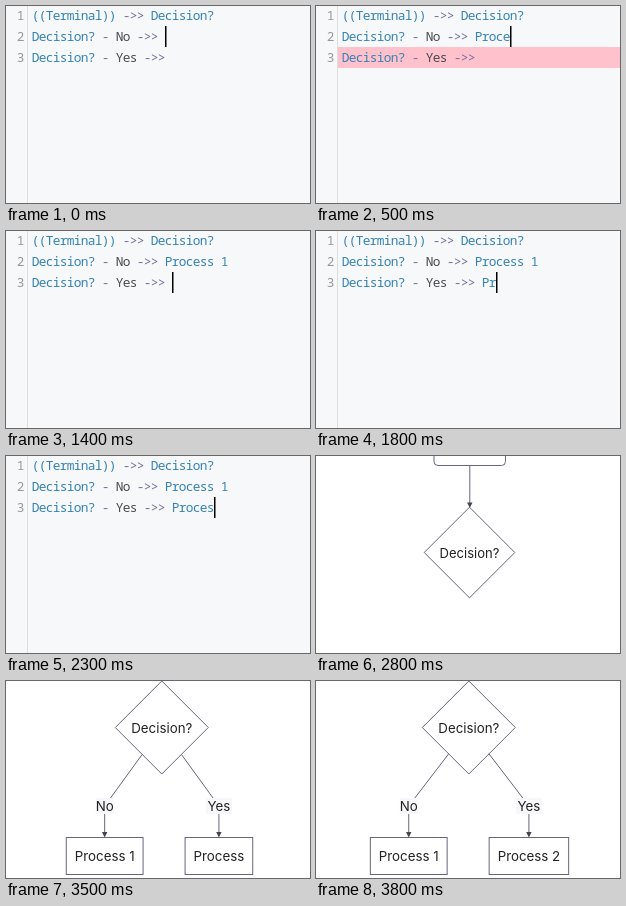
Recreate the animation shown at these times as an HTML page. Size 304 by 197 pixels, loop 4.4 s.

```html
<!DOCTYPE html>
<html lang="en">
<head>
<meta charset="utf-8">
<title>Typing a flowchart</title>
<style>
html, body { margin: 0; width: 100%; height: 100%; overflow: hidden; background: #fff; }
svg { display: block; width: 304px; height: 197px; }
text { white-space: pre; }
#editor text { font: 500 12.8px "Noto Sans Mono", "DejaVu Sans Mono", monospace; letter-spacing: -0.68px; }
#chart text { font: 13.3px Inter, Roboto, sans-serif; fill: #222; text-anchor: middle; }
#chart path, #chart rect.node { fill: none; stroke: #68667a; stroke-width: 1; }
#chart path.tip { fill: #44434f; stroke: none; }
</style>
</head>
<body>
<svg viewBox="0 0 304 197">
  <g id="editor"></g>
  <g id="chart"></g>
</svg>
<script>
const LOOP = 4400, CHAR = 7, LEFT = 26, ROW = 21, MIDDLE = 153.5;
const BLUE = '#3583b4', PURPLE = '#746c9c', DARK = '#4a4a52', GREY = '#96989e';
const editor = document.getElementById('editor');
const chart = document.getElementById('chart');

// Each step: [time, scene, first label, second label, active row, error row shown]
const steps = [[0, 'editor', '', '', 1, false]];
const type = (word, times, make) =>
  times.forEach((time, i) => steps.push([time, ...make(word.slice(0, i + 1))]));

type('Process 1', [100, 200, 300, 400, 500, 600, 700, 800, 900],
  s => ['editor', s, '', 1, s.length > 1]);
steps.push([1300, 'editor', 'Process 1', '', 2, false]);
type('Process 2', [1700, 1800, 1900, 2100, 2200, 2300, 2400, 2500, 2700],
  s => ['editor', 'Process 1', s, 2, false]);
steps.push([2800, 'start']);
[[3100, 'Pro'], [3200, 'Proc'], [3300, 'Proce'], [3400, 'Proces'], [3500, 'Process'], [3700, 'Process 2']]
  .forEach(([time, label]) => steps.push([time, 'branches', 'Process 1', label]));

function add(parent, tag, attrs, text) {
  const el = document.createElementNS('http://www.w3.org/2000/svg', tag);
  for (const key in attrs) el.setAttribute(key, attrs[key]);
  if (text) el.textContent = text;
  parent.append(el);
  return el;
}

function drawLine(row, tokens) {
  const y = 14 + row * ROW;
  add(editor, 'text', { x: 10.7, y, fill: GREY }, String(row + 1));
  let col = 0;
  for (const [word, fill] of tokens) {
    add(editor, 'text', { x: LEFT - 0.3 + col * CHAR, y, fill }, word);
    col += word.length + 1;
  }
}

function drawEditor(first, second, active, error) {
  add(editor, 'rect', { width: 304, height: 197, fill: '#f7f8fa' });
  add(editor, 'rect', { x: 21, width: 1, height: 197, fill: '#dddee1' });
  if (error) add(editor, 'rect', { x: 22, y: 41, width: 282, height: ROW, fill: '#ffc2cc' });
  const branch = (answer, label) =>
    [['Decision?', BLUE], ['-', PURPLE], [answer, DARK], ['->>', PURPLE], [label, BLUE]];
  drawLine(0, [['((Terminal))', BLUE], ['->>', PURPLE], ['Decision?', BLUE]]);
  drawLine(1, branch('No', first));
  drawLine(2, branch('Yes', second));
  const col = active === 1 ? 19 + first.length : 20 + second.length;
  add(editor, 'rect', { x: LEFT + col * CHAR, y: active * ROW - 1, width: 1.5, height: ROW, fill: '#000' });
}

const path = (d, cls = '') => add(chart, 'path', { d, class: cls });
const label = (x, y, text, style = '') => add(chart, 'text', { x, y, style }, text);

function drawDiamond(x, y, r, style) {
  path(`M${x} ${y - r}L${x + r} ${y}L${x} ${y + r}L${x - r} ${y}Z`);
  label(x, y + 5, 'Decision?', style);
}

function drawArrow(x, y1, y2) {
  path(`M${x} ${y1}V${y2 - 3}`);
  path(`M${x - 2.7} ${y2 - 5}h5.4l-2.7 5.5z`, 'tip');
}

function drawStart() {
  add(chart, 'rect', { class: 'node', x: 118, y: -24, width: 71.5, height: 33.5, rx: 4 });
  drawArrow(153.8, 10, 51.5);
  drawDiamond(MIDDLE, 96.5, 45.3, 'font-size:13.05px');
}

function drawBranch(top, x, width, answer, name) {
  const dx = x - top.x, dy = 125 - top.y;
  const k = top.r / (Math.abs(dx) + dy);
  path(`M${top.x + dx * k} ${top.y + dy * k}L${x} 125`);
  drawArrow(x, 125, 156);
  const half = answer.length * 4 + 1;
  add(chart, 'rect', { x: x - half, y: 117, width: half * 2, height: 16, fill: '#f7f6fa' });
  label(x, 130, answer);
  add(chart, 'rect', { class: 'node', x: x - width / 2, y: 156.5, width, height: 37 });
  label(x, 180, name);
}

function textWidth(text) {
  const el = label(0, 0, text);
  const width = el.getComputedTextLength();
  el.remove();
  return width;
}

function drawBranches(first, second) {
  const gap = 42, w1 = textWidth(first) + 17, w2 = textWidth(second) + 17;
  const left = MIDDLE - (w1 + gap + w2) / 2;
  const x1 = left + w1 / 2, x2 = left + w1 + gap + w2 / 2;
  const top = { x: (x1 + x2) / 2, y: 46.5, r: 46.5 };
  drawDiamond(top.x, top.y, top.r);
  drawBranch(top, x1, w1, 'No', first);
  drawBranch(top, x2, w2, 'Yes', second);
}

const scenes = { editor: drawEditor, start: drawStart, branches: drawBranches };
const begin = performance.now();
let shown;

function frame() {
  const t = (performance.now() - begin) % LOOP;
  const step = steps.findLast(s => s[0] <= t);
  if (step !== shown) {
    shown = step;
    editor.replaceChildren();
    chart.replaceChildren();
    const [, scene, ...args] = step;
    scenes[scene](...args);
  }
  requestAnimationFrame(frame);
}
frame();
</script>
</body>
</html>
```
